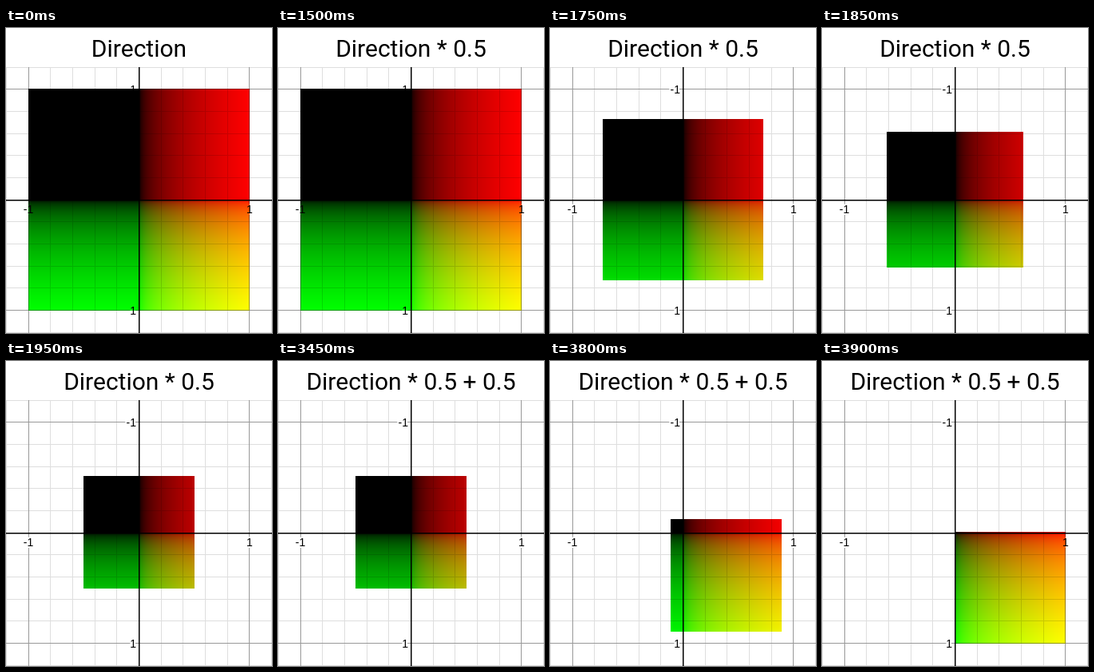
An HTML page with a canvas for the animation above (6900 ms loop, 333 by 382 pixels).

```html
<!DOCTYPE html>
<html lang="en">
<head>
<meta charset="utf-8">
<title>Direction remap</title>
<style>
  html, body { margin: 0; width: 100%; height: 100%; overflow: hidden; background: #fff; }
  svg, canvas { position: absolute; left: 0; top: 0; width: 333px; height: 382px; }
  canvas { mix-blend-mode: multiply; }
  .minor { stroke: #dedede; }
  .major { stroke: #999; }
  .axis { stroke: #000; stroke-width: 1.5; }
  .label {
    font: 14px "Liberation Sans", Arial, sans-serif;
    stroke: #fff; stroke-width: 4; stroke-linejoin: round; paint-order: stroke;
  }
  #title { font: 30px Roboto, sans-serif; text-anchor: middle; }
</style>
</head>
<body>
<svg id="graph" viewBox="0 0 333 382">
  <text id="title" x="166.5" y="36">Direction</text>
</svg>
<canvas id="field" width="333" height="382"></canvas>
<script>
const W = 333, H = 382, TOP = 49;
const CX = 166.5, CY = 215.1, UNIT = 138.4;
const LOOP = 6900, STEP = 50, STEPS = 10;
const SHRINK = 1500, SHIFT = 3450;

const graph = document.getElementById('graph');
const title = document.getElementById('title');
const field = document.getElementById('field');

function add(tag, attrs, text = '') {
  const el = document.createElementNS('http://www.w3.org/2000/svg', tag);
  for (const key in attrs) el.setAttribute(key, attrs[key]);
  el.textContent = text;
  graph.append(el);
}

const vline = (x, cls) => add('line', { x1: x, x2: x, y1: TOP, y2: H, class: cls });
const hline = (y, cls) => add('line', { x1: 0, x2: W, y1: y, y2: y, class: cls });
const label = (text, x, y, anchor) =>
  add('text', { x, y, class: 'label', 'text-anchor': anchor }, text);

function drawGrid() {
  const snap = v => Math.floor(v) + 0.5;
  for (const cls of ['minor', 'major']) {
    for (let i = -6; i <= 6; i++) {
      if (i === 0 || (Math.abs(i) === 5) !== (cls === 'major')) continue;
      vline(snap(CX + i * UNIT / 5), cls);
      hline(snap(CY + i * UNIT / 5), cls);
    }
  }
  vline(Math.floor(CX) + 0.75, 'axis');
  hline(Math.floor(CY) + 0.75, 'axis');
  for (const n of [-1, 1]) {
    label(n, CX + n * UNIT, 232, 'middle');
    label(n, 163, CY + n * UNIT + 5, 'end');
  }
}

// Linear value to an sRGB byte
function encode(v) {
  v = Math.min(1, Math.max(0, v));
  return 255 * (v <= 0.0031308 ? 12.92 * v : 1.055 * v ** (1 / 2.4) - 0.055);
}

// Red follows x and green follows y; the visible part is clipped later
function paintField() {
  const ctx = field.getContext('2d');
  const img = ctx.createImageData(W, H);
  for (let y = 0, p = 0; y < H; y++) {
    const green = encode((y + 0.5 - CY) / UNIT);
    for (let x = 0; x < W; x++, p += 4) {
      img.data[p] = encode((x + 0.5 - CX) / UNIT);
      img.data[p + 1] = green;
      img.data[p + 3] = 255;
    }
  }
  ctx.putImageData(img, 0, 0);
}

function progress(t, start) {
  const k = Math.floor((t - start) / STEP);
  return Math.min(1, Math.max(0, k / (STEPS - 1)));
}

function render(t) {
  const size = 1 - 0.5 * progress(t, SHRINK);
  const move = 0.5 * progress(t, SHIFT);
  const near = (move - size) * UNIT, far = (move + size) * UNIT;
  const left = Math.floor(CX + near), right = Math.ceil(CX + far);
  // The upper edge falls on even rows
  const top = 2 * Math.floor((CY + near) / 2), bottom = Math.ceil(CY + far);
  field.style.clipPath = `inset(${top}px ${W - right}px ${H - bottom}px ${left}px)`;

  const text = 'Direction' + (t >= SHRINK ? ' * 0.5' : '') + (t >= SHIFT ? ' + 0.5' : '');
  if (title.textContent !== text) title.textContent = text;
}

drawGrid();
paintField();
render(0);

const begin = performance.now();
function tick() {
  render((performance.now() - begin) % LOOP);
  requestAnimationFrame(tick);
}
requestAnimationFrame(tick);
</script>
</body>
</html>
```
